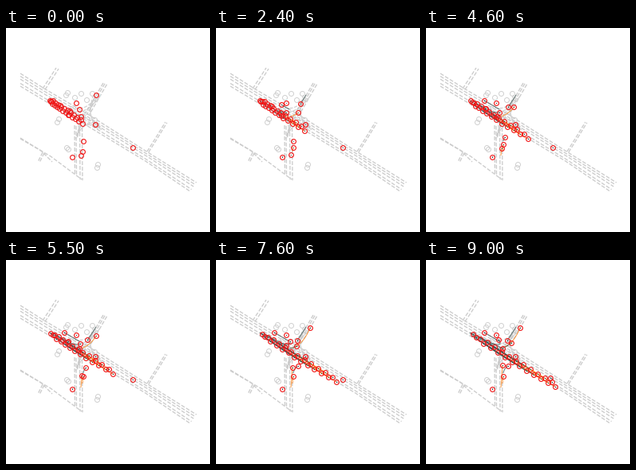
A matplotlib script for the animation above (9100 ms loop, 256x256 px).

```python
import itertools

import numpy as np
import matplotlib.pyplot as plt
from matplotlib.animation import FuncAnimation
from matplotlib.collections import LineCollection

FRAMES, STEP = 91, 100
SECONDS = np.arange(FRAMES) * STEP / 1000
PT = 0.72  # points per pixel at 100 dpi
GREY, RED, ORANGE, DARK = "#cccccc", "#f01414", "#ff7f0e", "#3f5553"
QUEUE = 24
rng = np.random.default_rng(4)


def smooth(u):
    return u * u * (3 - 2 * u)


def power(p):
    return lambda u: u ** p


def brake(u):
    return 1 - (1 - u) ** 2.5


def bend(a, b, c, u):
    """Quadratic curve from a to c, pulled towards b."""
    u = np.asarray(u)[:, None]
    a, b, c = map(np.array, (a, b, c))
    return (1 - u) ** 2 * a + 2 * u * (1 - u) * b + u ** 2 * c


def drive(start, end, via=None, begin=0, stop=9, ease=power(1)):
    u = ease(np.clip((SECONDS - begin) / (stop - begin), 0, 1))
    if via is None:
        via = np.add(start, end) / 2
    return bend(start, via, end, u)


def queue_car(q, side):
    """q runs from the last car (0) to the first (1); the front pulls off earlier."""
    x0 = 55 + 41 * q ** 1.3
    x1 = 59 + 103 * q
    x = x0 + (x1 - x0) * (SECONDS / 9) ** (2 - 0.9 * q * q)
    d = x - 55
    shift = side * 1.8 * min(1, 8 * q) + rng.normal(0, 0.4)
    return np.column_stack([x, 91 + 0.683 * d - 0.0006 * d * d + shift])


movers = [(drive((x, y), (x, y)), DARK) for x, y in [(88, 94), (83, 161.5), (112, 121)]]
for k in range(QUEUE):
    q = k / (QUEUE - 1)
    movers.append((queue_car(q, 1 if k % 2 else -1), ORANGE if q > 0.75 else DARK))
movers += [
    # Upper side road
    (drive((113, 84), (102, 101), stop=7.5, ease=brake), DARK),
    (drive((94, 111), (118, 85), via=(110, 106), stop=7.6), ORANGE),
    # Turns at the junction
    (drive((92, 102), (73, 91), stop=4.6, ease=smooth), DARK),
    (drive((80, 104), (91, 99.5), via=(98, 110)), DARK),
    (drive((78, 109), (107, 103.5), via=(96, 115), ease=power(1.7)), DARK),
    (drive((68, 97), (96, 111), ease=power(2)), DARK),
    # Lower side road
    (drive((97, 142), (103, 133), via=(98, 136), begin=3.4, ease=brake), DARK),
    (drive((96, 155), (97, 146), begin=1.3, stop=3.4, ease=smooth), ORANGE),
    (drive((94, 160), (96, 132), begin=1.8, ease=smooth), ORANGE),
    # Oncoming
    (drive((159, 149.5), (155.5, 147.5), begin=7.6, ease=power(2)), DARK),
]
movers.sort(key=lambda m: m[1] == DARK)
paths = np.array([path for path, _ in movers])

fig = plt.figure(figsize=(2.56, 2.56), dpi=100, facecolor="white")
ax = fig.add_axes([0, 0, 1, 1])
ax.set(xlim=(0, 256), ylim=(256, 0))
ax.axis("off")


def lane(points, width=0.95):
    ax.plot(*np.transpose(points), color=GREY, lw=width, ls="--", zorder=1)


def lanes(points, shifts):
    for s in shifts:
        lane(np.add(points, (s, s * 0.4)))


# Main road: lanes spread between its two edges
upper = np.array([(18, 57), (48, 76), (104, 109), (178, 156), (239, 194)])
lower = np.array([(18, 73), (48, 91), (104, 124), (175, 167), (231, 205)])
for f in (0, 0.22, 0.45, 0.78, 1):
    lane(upper + (lower - upper) * f)

# Side roads
lanes([(46, 76), (54, 64), (63, 50)], (0, 3))
lanes([(177, 155), (189, 136), (200, 118)], (0, 2))
lanes([(46, 156), (40.5, 167)], (0, 2))
lanes([(122, 69), (111, 88), (100, 107)], (0, 2, 4.5))
lanes([(86, 122), (86.5, 185)], (0, 2))
lanes([(92.5, 124), (93, 190)], (0, 3))
lane([(18, 138), (44, 154), (58, 168)])
lane([(18, 139), (56, 161), (95, 190)])

# Junction: every arm joined to every other
arms = [(78, 102), (113, 88), (120, 126), (90, 136)]
for a, b in list(itertools.combinations(arms, 2)) * 2:
    a, b, mid = (rng.normal(p, 2) for p in (a, b, (98, 111)))
    lane(bend(a, mid, b, np.linspace(0, 1, 20)), 0.8)

bystanders = [(77, 81), (75, 83.5), (94, 82), (108, 82), (86, 87), (101, 90),
              (66, 114), (64, 118), (76, 149.5), (78, 152), (115, 171),
              (114, 175), (111, 115)]
ax.plot(*zip(*bystanders), "o", mfc="none", mec="#d0d0d0", mew=0.7, ms=6 * PT, zorder=2)

trails = LineCollection([], colors=[color for _, color in movers],
                        linewidths=0.7, alpha=0.8, zorder=3)
ax.add_collection(trails, autolim=False)
dots, = ax.plot([], [], "o", color=DARK, mec="none", ms=1.4 * PT, zorder=4)
rings, = ax.plot([], [], "o", mfc="none", mec=RED, mew=0.8, ms=5.8 * PT, zorder=5)


def update(i):
    here = paths[:, i].T
    trails.set_segments(list(paths[:, :i + 1]))
    dots.set_data(*here)
    dots.set_alpha(min(1, i / 35))
    rings.set_data(*here)
    return trails, dots, rings


anim = FuncAnimation(fig, update, frames=FRAMES, interval=STEP, repeat=True,
                     repeat_delay=0, blit=False)
plt.show()
```
